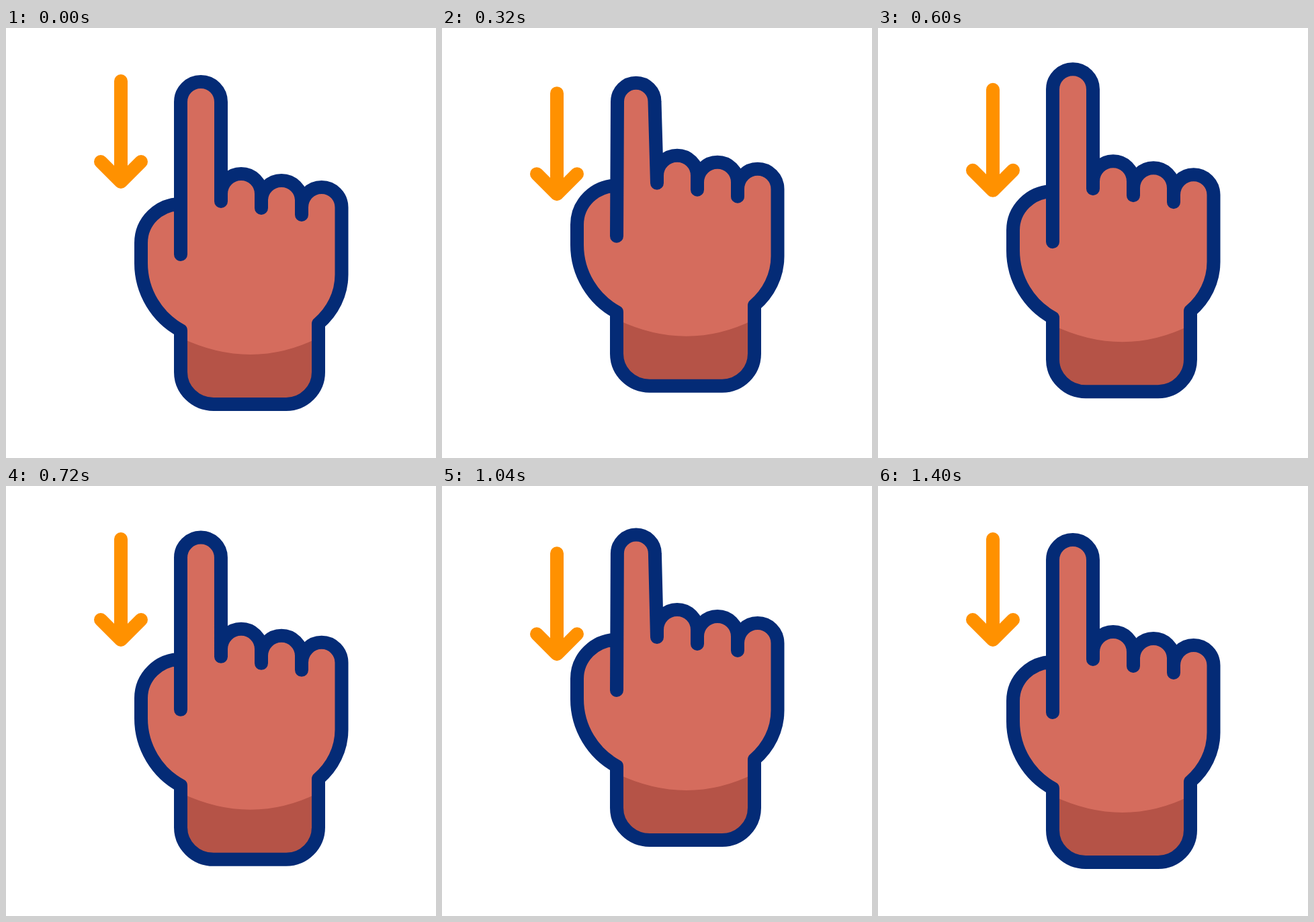
These frames come from a looping animation (640 px wide and 640 px high, 1480 ms). An HTML page:

```html
<!DOCTYPE html>
<html lang="en">
<head>
<meta charset="utf-8">
<title>Scroll gesture</title>
<style>
  html, body { margin: 0; width: 100%; height: 100%; overflow: hidden; background: #fff; }
  svg { display: block; width: 100vw; height: 100vh; }
  .line { fill: none; stroke-width: 20; stroke-linecap: round; stroke-linejoin: round; }
</style>
</head>
<body>
<svg viewBox="0 0 640 640">
  <path id="arrow" class="line" stroke="#ff9100" d="M171 79V229M141 199L171 229L201 199"/>
  <g id="hand">
    <path id="skin" fill="#d56c5d"/>
    <path fill="#b55347" d="M260 461Q365 511 465 461V512A48 48 0 0 1 417 560H309A49 48 0 0 1 260 512Z"/>
    <path id="outline" class="line" stroke="#042b76"/>
  </g>
</svg>
<script>
  const LOOP = 1480, STEP = 40;

  // [step, value] pairs, eased between neighbours
  const LIFT = [[1, 0], [12, -38.5], [17.5, -4], [29, -38.5], [35, 0]];
  const DROP = [[1, 0], [12, 25.7], [18, 0], [29, 25.7], [35, 0]];
  const BEND = [[1, 0], [6, 1], [8, 1], [12, 0], [17.5, 0], [22.5, 1], [25, 1], [29.5, 0]];

  const [arrow, hand, skin, outline] =
    ['arrow', 'hand', 'skin', 'outline'].map(id => document.getElementById(id));

  const ease = p => (1 - Math.cos(Math.PI * p)) / 2;

  function valueAt(keys, n) {
    const i = keys.findIndex(k => k[0] > n);
    if (i === 0) return keys[0][1];
    if (i < 0) return keys[keys.length - 1][1];
    const [a, from] = keys[i - 1], [b, to] = keys[i];
    return from + (to - from) * ease((n - a) / (b - a));
  }

  const PALM = 'M260 262A59 58 0 0 0 201 320V350C201 393 225 431 260 450V512' +
    'A49 48 0 0 0 309 560H417A48 48 0 0 0 465 512V440C486 422 499.5 396 499.5 367V267' +
    'A29.75 30 0 0 0 440 267V278V257A30 30 0 0 0 380 257V268V247A30 30 0 0 0 320 247V258';

  function handPath(bend) {
    const left = 260 + bend, right = 320 - 3.5 * bend;
    const r = (right - left) / 2, y = 80 + 29 * bend + r;
    return `${PALM}L${right} ${y}A${r} ${r} 0 0 0 ${left} ${y}L260 337`;
  }

  function draw(ms) {
    const n = Math.floor(ms % LOOP / STEP);
    const d = handPath(valueAt(BEND, n));
    skin.setAttribute('d', d);
    outline.setAttribute('d', d);
    hand.setAttribute('transform', `translate(0 ${valueAt(LIFT, n)})`);
    arrow.setAttribute('transform', `translate(0 ${valueAt(DROP, n)})`);
  }

  const start = performance.now();
  function tick() {
    draw(performance.now() - start);
    requestAnimationFrame(tick);
  }
  tick();
</script>
</body>
</html>
```
